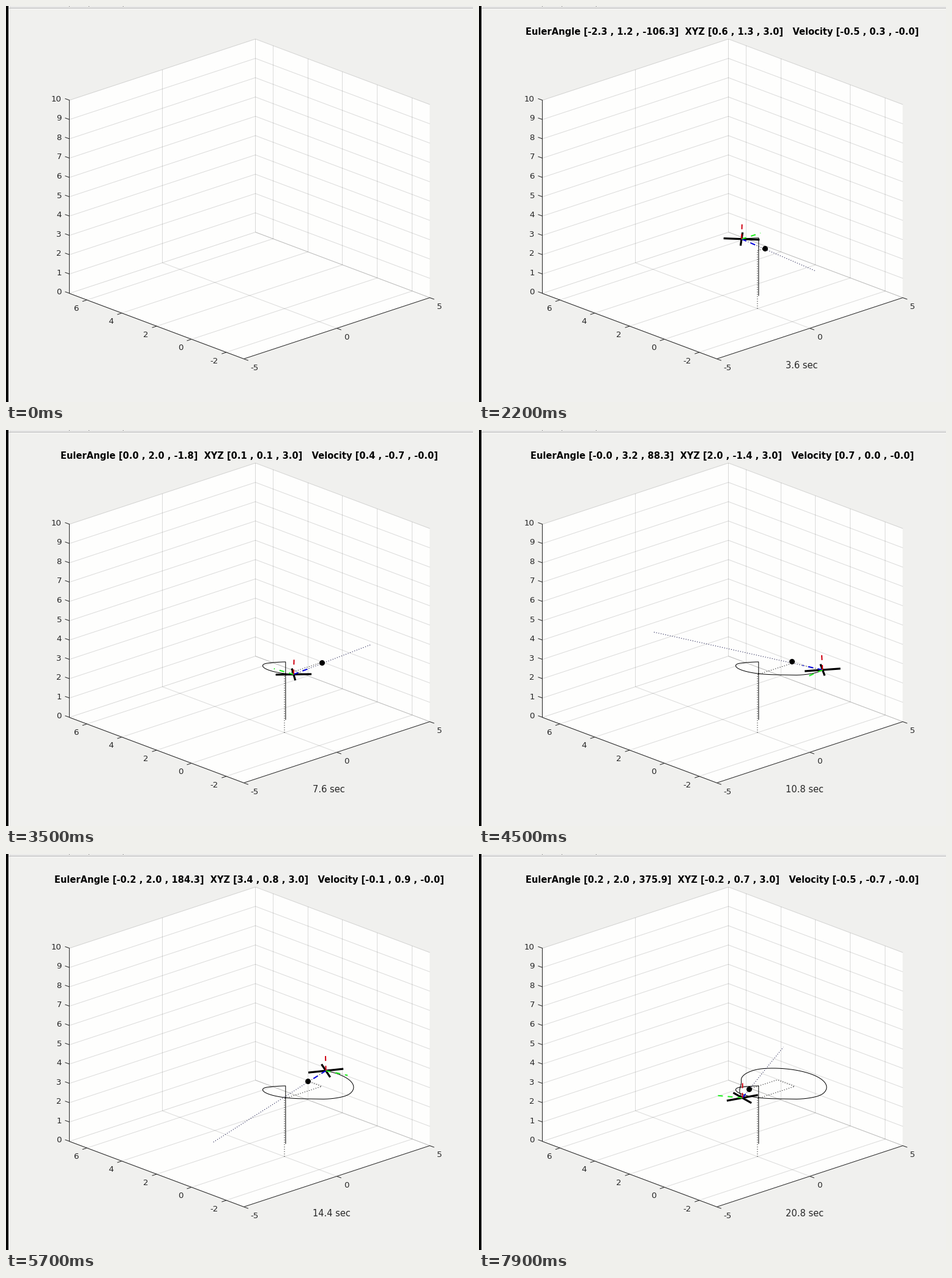
Write a matplotlib script that moves like this. It is 763 px wide and 647 px high and loops after 8000 ms.

```python
import numpy as np
import matplotlib.pyplot as plt
from matplotlib.animation import FuncAnimation

W, H, DPI = 763, 647, 64
PX = 72 / DPI                      # points per pixel
INK = "#262626"
DT = 0.4                           # simulated seconds per step

plt.rcParams["font.family"] = "DejaVu Sans"
plt.rcParams["path.snap"] = False
fig = plt.figure(figsize=(W / DPI, H / DPI), dpi=DPI, facecolor="#f0f0ee")
ax = fig.add_axes([0, 0, 1, 1])
ax.set_xlim(-0.5, W - 0.5)
ax.set_ylim(H - 0.5, -0.5)
ax.axis("off")

# orthographic view: screen position of the corner and of the unit vectors
CORNER = np.array([387.85, 576])
BASIS = np.array([[30.38, -10.0], [-28.44, -10.7], [0, -31.55]])
LOW, HIGH = np.array([-5, -3, 0]), np.array([5, 7, 10])


def project(p):
    return CORNER + (np.asarray(p, float) - LOW) @ BASIS


def crisp(p):
    """Projected points with whole x, so that upright lines stay sharp."""
    q = project(p)
    q[:, 0] = np.round(q[:, 0])
    return q


def line(pts, color=INK, width=1.0, **kw):
    pts = np.asarray(pts, float)
    return ax.plot(pts[:, 0], pts[:, 1], color=color, lw=width * PX,
                   solid_capstyle="butt", dash_capstyle="butt", **kw)[0]


def label(x, y, s, size=13.33, **kw):
    kw.setdefault("color", INK)
    return ax.text(x, y, s, fontsize=size * PX, **kw)


# ---- window edges ----
def draw_window():
    ax.fill([4, W, W, 4], [-1, -1, 2.5, 2.5], color="#e9e9e8", lw=0)
    line([(4, 3), (W, 3)], "#b4b4b4")
    line([(4, 4), (W, 4)], "#f8f8f8")
    for x in (103, 135, 191):
        line([(x, -0.5), (x, 0.5)], "#707070")
    ax.fill([-1, 3.5, 3.5, -1], [-1, -1, H, H], color="black", lw=0)


# ---- axes box ----
def draw_box():
    faces = [
        [(-5, -3, 0), (5, -3, 0), (5, 7, 0), (-5, 7, 0)],
        [(5, -3, 0), (5, 7, 0), (5, 7, 10), (5, -3, 10)],
        [(-5, 7, 0), (5, 7, 0), (5, 7, 10), (-5, 7, 10)],
    ]
    for f in faces:
        ax.fill(*project(f).T, color="#fefefd", lw=0)

    xs, ys, zs = range(-5, 6, 5), range(-2, 7, 2), range(11)
    grid = []
    for x in xs:
        grid += [[(x, -3, 0), (x, 7, 0)], [(x, 7, 0), (x, 7, 10)]]
    for y in ys:
        grid += [[(-5, y, 0), (5, y, 0)], [(5, y, 0), (5, y, 10)]]
    for z in zs:
        grid += [[(5, -3, z), (5, 7, z)], [(-5, 7, z), (5, 7, z)]]
    for g in grid:
        line(crisp(g), alpha=0.16)

    line(crisp([(-5, 7, 10), (-5, 7, 0), (-5, -3, 0), (5, -3, 0)]))
    ticks = [((-5, 7, z), z, (-7.5, -2.7), (-13, -3), "right") for z in zs]
    ticks += [((-5, y, 0), y, (-7.5, 2.5), (-13.5, 13), "right") for y in ys]
    ticks += [((x, -3, 0), x, (7.5, 2.7), (11.5, 14), "left") for x in xs]
    for pos, val, mark, off, side in ticks:
        p = project(pos)
        line([p, p + mark])
        label(p[0] + off[0], p[1] + off[1] + 4.8, str(val), ha=side)


draw_window()
draw_box()

# ---- motion ----
RADIUS = 1.425                     # distance kept from the ball
SPIN = np.radians(28.25)           # orbit speed per second
LAGS = np.linspace(0.4, 1.2, 17)   # the drone follows its goal late
H_STEP = 0.05


def ball(t):
    """Up, along x, along y, then back along x."""
    x = np.interp(t, [3, 8, 18.6, 22], [0, 2, 2, 0])
    y = np.interp(t, [10.2, 16], [0, 1])
    z = np.interp(t, [0, 1.5], [0, 3])
    return np.stack([x, y, z], axis=-1)


def goal(t):
    phi = np.pi / 4 + SPIN * np.maximum(0, t - 2.1)
    ring = np.stack([np.cos(phi), np.sin(phi)], axis=-1)
    return ball(t)[..., :2] + RADIUS * ring


def drone(t):
    t = np.asarray(t, float)
    xy = np.mean([goal(t - lag) for lag in LAGS], axis=0)
    z = np.clip(0.4 + 4.7 * (t - 1.2), 0, 3)
    return np.concatenate([xy, z[..., None]], axis=-1)


def velocity(t):
    v = (drone(t + H_STEP) - drone(t - H_STEP)) / (2 * H_STEP)
    if t > 2:
        v[2] -= 0.01               # slight sink in level flight
    return v


GRID = np.arange(0, 21.3, 0.05)
PATH, TRAIL = drone(GRID), ball(GRID)
GAZE = TRAIL - PATH
AIM = np.unwrap(np.arctan2(GAZE[:, 1], GAZE[:, 0]))


def attitude(t):
    """Yaw looks at the ball; roll and pitch lean into the acceleration."""
    turn = min(0.0, -17.7 - 156 * (t - 1.2))
    yaw = max(np.degrees(np.interp(t, GRID, AIM)), turn)
    acc = drone(t + H_STEP) - 2 * drone(t) + drone(t - H_STEP)
    lean = np.degrees(acc / H_STEP ** 2 / 9.81)
    c, s = np.cos(np.radians(yaw)), np.sin(np.radians(yaw))
    roll = lean[0] * s - lean[1] * c
    pitch = lean[0] * c + lean[1] * s
    return np.round([roll, pitch, yaw], 6) + 0.0


def box_exit(p, d):
    """Where a ray from p along d leaves the axes box."""
    reach = [((HIGH if c > 0 else LOW)[i] - p[i]) / c
             for i, c in enumerate(d) if abs(c) > 1e-9]
    return p + d * min(reach)


def step_at(frame):
    """Simulation step on screen; the run slows down a little."""
    if frame < 9:
        return -1
    return int(np.interp(frame, [9, 12, 18, 57, 67, 79],
                         [0, 1.9, 7.2, 37.7, 45.3, 53.2]))


# ---- moving parts ----
EMPTY = [(0, 0)]
DOTS = (0, (1.1, 2.7))
DASH = (0, (4, 4))
trail = line(EMPTY, "black", ls=DOTS, zorder=3)
path = line(EMPTY, "black", zorder=3)
sight = line(EMPTY, "#000038", ls=DOTS, zorder=3)
arms = [line(EMPTY, "black", 3.2, zorder=4) for _ in range(2)]
rods = [line(EMPTY, c, 2, ls=DASH, zorder=5)
        for c in ("#0000e0", "#20f020", "#d00010")]
dot = line(EMPTY, "black", marker="o", markersize=9 * PX,
           markeredgewidth=0, zorder=6)
title = label(397.3, 46, "", 14.67, color="black", weight="bold", ha="center")
clock = label(500.5, 591.3, "", 14.67)
parts = [trail, path, sight, *arms, *rods, dot, title, clock]


def place(artist, pts):
    artist.set_data(*project(np.atleast_2d(pts)).T)


def triple(v):
    return "[" + " , ".join(f"{c:.1f}" for c in v) + "]"


def update(frame):
    step = step_at(frame)
    for a in parts:
        a.set_visible(step >= 0)
    if step < 0:
        return parts

    t = step * DT
    n = int(round(t / 0.05)) + 1
    p = drone(t)
    _, pitch, yaw = np.radians(attitude(t))
    c, s = np.cos(yaw), np.sin(yaw)
    front = np.array([c * np.cos(pitch), s * np.cos(pitch), -np.sin(pitch)])
    left = np.array([-s, c, 0])
    up = np.cross(front, left)

    place(trail, TRAIL[:n])
    place(path, PATH[:n])
    place(sight, [p, box_exit(p, front)])
    for arm, side in zip(arms, (1, -1)):
        half = (front + side * left) / 2
        place(arm, [p - half, p + half])
    for rod, d in zip(rods, (front, left, up)):
        place(rod, [p, p + d])
    place(dot, ball(t))

    # the readout trails the picture by one step
    if step == 0:
        title.set_text("")
        clock.set_text("")
    else:
        t -= DT
        title.set_text(f"EulerAngle {triple(attitude(t))}  XYZ {triple(drone(t))}"
                       f"   Velocity {triple(velocity(t))}")
        clock.set_text(f"{t:.1f} sec")
    return parts


anim = FuncAnimation(fig, update, frames=80, interval=100, repeat=True,
                     repeat_delay=0, init_func=lambda: update(0), blit=False)
plt.show()
```
